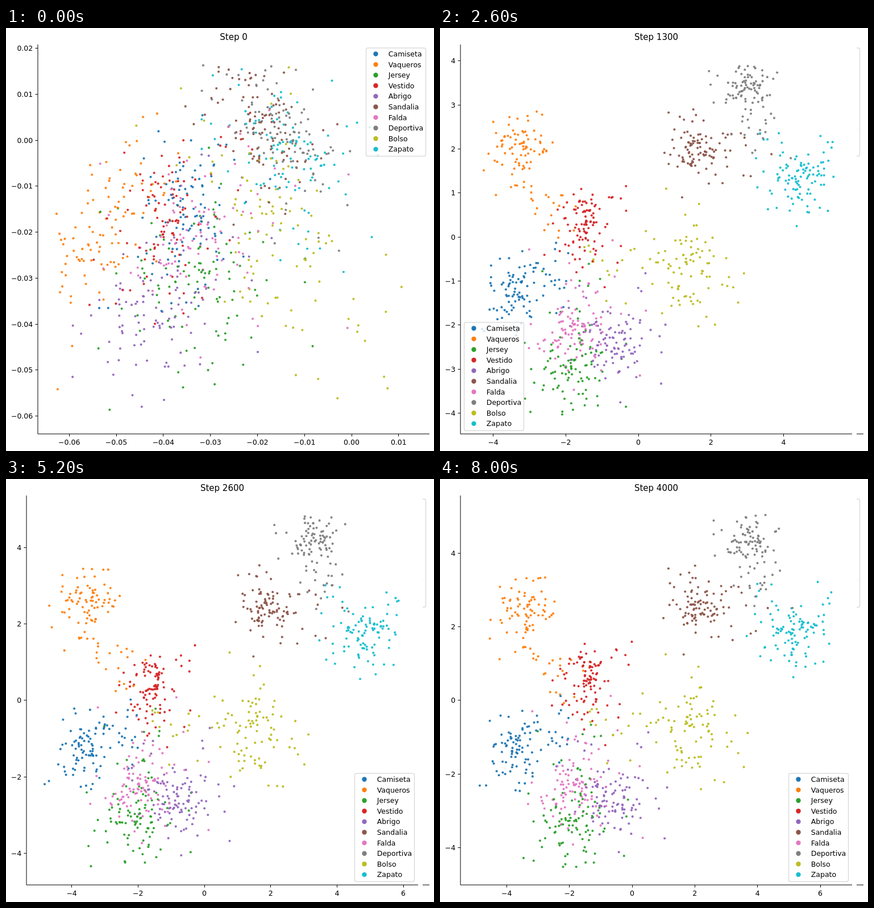
Write an HTML page with a canvas that moves like this. It is 753 by 743 pixels and loops after 8.2 s.

```html
<!DOCTYPE html>
<html lang="es">
<head>
<meta charset="utf-8">
<title>Step</title>
<style>
html, body { margin: 0; width: 100%; height: 100%; overflow: hidden; background: #fff; }
canvas { display: block; }
</style>
</head>
<body>
<canvas id="plot" width="753" height="743"></canvas>
<script>
const ctx = document.getElementById("plot").getContext("2d");
const FONT = '"DejaVu Sans", sans-serif';
const FRAME_MS = 200, FRAMES = 41, PER_CLASS = 100;
const TOP = 29, BASE = 713, WIDTH = 690;
const FIRST_LEFT = 56, LATER_LEFT = 36;

// Each class moves from a loose blob around `from` to a cluster around `to`
const CLASSES = [
  { name: "Camiseta", color: "#1f77b4", from: [322, 325], to: [130, 470], size: 30 },
  { name: "Vaqueros", color: "#ff7f0e", from: [183, 345], to: [147, 215], size: 29 },
  { name: "Jersey", color: "#2ca02c", from: [340, 455], to: [230, 605], size: 34 },
  { name: "Vestido", color: "#d62728", from: [278, 325], to: [252, 338], size: 31 },
  { name: "Abrigo", color: "#9467bd", from: [260, 490], to: [303, 562], size: 35 },
  { name: "Sandalia", color: "#8c564b", from: [457, 182], to: [455, 222], size: 25 },
  { name: "Falda", color: "#e377c2", from: [345, 375], to: [238, 548], size: 42 },
  { name: "Deportiva", color: "#7f7f7f", from: [492, 188], to: [550, 102], size: 25 },
  { name: "Bolso", color: "#bcbd22", from: [480, 365], to: [440, 433], size: 41 },
  { name: "Zapato", color: "#17becf", from: [500, 222], to: [640, 266], size: 31 }
];

// Uncertain dots are drawn towards the hub on their side
const LEFT_HUB = [255, 420], RIGHT_HUB = [565, 225];
for (const cls of CLASSES) cls.hub = cls.to[1] < 300 && cls.to[0] > 400 ? RIGHT_HUB : LEFT_HUB;

const lerp = (a, b, p) => a + (b - a) * p;

// Mirrors values that leave the range
function fold(v, lo, hi) {
  if (v < lo) v = 2 * lo - v;
  return v > hi ? 2 * hi - v : v;
}

function random(seed) {
  return () => {
    seed = (seed + 0x6D2B79F5) | 0;
    let t = Math.imul(seed ^ (seed >>> 15), 1 | seed);
    t = (t + Math.imul(t ^ (t >>> 7), 61 | t)) ^ t;
    return ((t ^ (t >>> 14)) >>> 0) / 4294967296;
  };
}

function gauss(rnd) {
  const r = Math.sqrt(-2 * Math.log(1 - rnd()));
  return Math.min(r, 2.6) * Math.cos(2 * Math.PI * rnd());
}

const rnd = random(417);
const dots = [];
for (let i = 0; i < PER_CLASS; i++) {
  for (const cls of CLASSES) {
    const reach = lerp(0.5, 1.25, rnd());
    dots.push({
      cls,
      gx: gauss(rnd) * reach,
      gy: gauss(rnd) * reach,
      pull: 0.85 * (Math.max(0, rnd() - 0.7) / 0.3) ** 1.5
    });
  }
}

// Slow vertical swing of the plot, in pixels
const swing = step => 14 * Math.cos(2 * Math.PI * (step - 600) / 1800);

// Zero position and pixels per unit; the data spread out as training goes on
function viewAt(step) {
  if (!step) return { x: 608, sx: 8280, y: 197, sy: 8075 };
  return {
    x: 349 - 11 * Math.max(0, step - 3000) / 1000,
    sx: 70.6 * (step / 600) ** -0.13,
    y: 378 + swing(step),
    sy: 64 + 29 * Math.exp((600 - step) / 900)
  };
}

function tickStep(range) {
  const mag = 10 ** Math.floor(Math.log10(range / 9));
  return [1, 2, 2.5, 5, 10].map(m => m * mag).find(s => range / s <= 9);
}

function ticks(lo, hi) {
  const step = tickStep(hi - lo), list = [];
  const digits = Math.max(0, -Math.floor(Math.log10(step) + 1e-9));
  for (let n = Math.ceil(lo / step); n * step <= hi; n++) {
    const v = n * step;
    list.push([v, (n < 0 ? "\u2212" : "") + Math.abs(v).toFixed(digits)]);
  }
  return list;
}

function text(str, x, y, size, align) {
  ctx.font = size + "px " + FONT;
  ctx.textAlign = align;
  ctx.fillStyle = "#000";
  ctx.fillText(str, x, Math.round(y));
}

function disc(x, y, r, color) {
  ctx.fillStyle = color;
  ctx.beginPath();
  ctx.arc(x, y, r, 0, 2 * Math.PI);
  ctx.fill();
}

function drawSpines(left) {
  ctx.fillStyle = "#000";
  ctx.fillRect(left - 0.5, TOP, 1, BASE - TOP);
  ctx.fillRect(left, BASE - 0.5, WIDTH - 1, 1);
}

function drawAxes(left, view, step) {
  drawSpines(left);
  for (const [v, label] of ticks((left - view.x) / view.sx, (left + WIDTH - view.x) / view.sx)) {
    const x = view.x + v * view.sx;
    ctx.fillRect(Math.round(x - 0.5), BASE, 1, 4.5);
    text(label, x, BASE + 18.5, 12.5, "center");
  }
  for (const [v, label] of ticks((view.y - BASE) / view.sy, (view.y - TOP) / view.sy)) {
    const y = view.y - v * view.sy;
    ctx.fillRect(left - 4.5, Math.round(y - 0.5), 4.5, 1);
    text(label, left - 8.75, y + 4.5, 12.5, "right");
  }
  text("Step " + step, left + WIDTH / 2 - 0.5, 21, 15, "center");
}

function drawLegend(x, y) {
  ctx.beginPath();
  ctx.roundRect(x + 0.5, y, 105, 190, 3);
  ctx.fillStyle = "rgba(255,255,255,0.8)";
  ctx.fill();
  ctx.strokeStyle = "rgba(204,204,204,0.8)";
  ctx.lineWidth = 1.25;
  ctx.stroke();
  CLASSES.forEach((cls, k) => {
    const row = y + 10.5 + k * 18.6;
    disc(x + 17.5, row, 4.2, cls.color);
    text(cls.name, x + 39.75, row + 4.5, 12.5, "left");
  });
}

// Loose start layout: an arch that rises on the left and falls on the right
function startPos({ cls, gx, gy }) {
  const [x, y] = cls.from, tilt = (x - 350) / 250;
  return [x + gx * cls.size * 2.1, y + (gy + tilt * gx) * cls.size * 2.6];
}

function clusterPos({ cls, gx, gy, pull }, step) {
  const [x, y] = cls.to, [hx, hy] = cls.hub;
  const lift = swing(step) * 0.8 * Math.sin(Math.PI * (y - 60) / 622);
  return [
    lerp(x, hx, pull) + gx * cls.size,
    lerp(y, hy, pull) + gy * cls.size * 1.12 + lift
  ];
}

function drawDots(step, left) {
  const noise = random(step * 7 + 91);
  const jitter = step ? 4 : 0;
  const shift = new Map(CLASSES.map(cls => [cls, [jitter * gauss(noise), jitter * gauss(noise)]]));
  const grown = 1 - (1 - Math.min(1, step / 600)) ** 4;
  ctx.globalAlpha = 0.95;
  for (const dot of dots) {
    const a = startPos(dot), b = clusterPos(dot, step);
    const [x, y] = [0, 1].map(i =>
      lerp(a[i], b[i], grown) + shift.get(dot.cls)[i] + jitter * gauss(noise));
    disc(fold(x, left + 31, left + 657), fold(y, 60, 682), 2.05, dot.cls.color);
  }
  ctx.globalAlpha = 1;
}

function draw(frame) {
  const step = frame * 100, left = step ? LATER_LEFT : FIRST_LEFT;
  ctx.fillStyle = "#fff";
  ctx.fillRect(0, 0, 753, 743);
  if (step) {
    // Later plots are narrower and leave a strip of the first one on the right
    drawSpines(FIRST_LEFT);
    drawLegend(633, 35);
    ctx.fillStyle = "#fff";
    ctx.fillRect(0, 0, 733, 743);
  }
  drawDots(step, left);
  drawAxes(left, viewAt(step), step);
  if (!step) drawLegend(633, 35);
  else if (step === 1300) drawLegend(42, 517);
  else drawLegend(613, 517);
}

let shown = -1;
function tick(now) {
  const frame = Math.floor(now / FRAME_MS) % FRAMES;
  if (frame !== shown) draw(shown = frame);
  requestAnimationFrame(tick);
}
draw(0);
requestAnimationFrame(tick);
</script>
</body>
</html>
```
